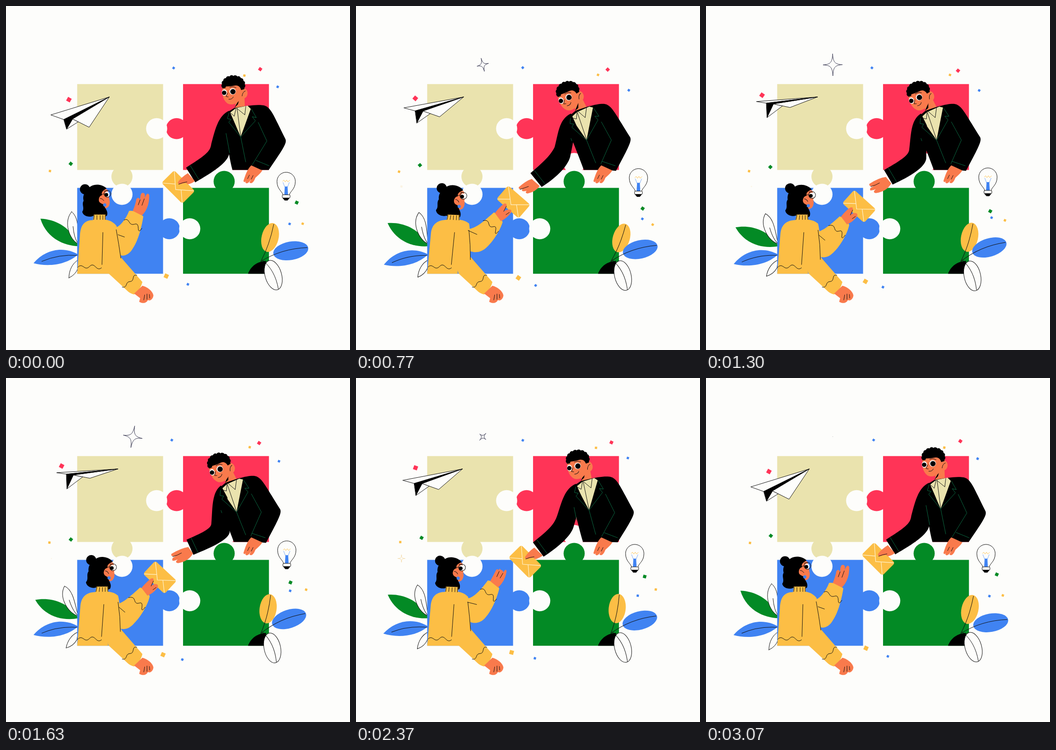
Write an HTML page that moves like this. It is 748x748 px and loops after 3110 ms.

```html
<!DOCTYPE html>
<html lang="en">
<head>
<meta charset="utf-8">
<title>Puzzle teamwork</title>
<style>
  html, body { margin: 0; width: 100%; height: 100%; overflow: hidden; background: #fdfdfb; }
  svg { display: block; width: 100%; height: 100%; }
  .beige { fill: #eae3ae; } .red { fill: #ff3457; } .blue { fill: #4083f2; } .green { fill: #038a25; }
  .yellow { fill: #fcbe45; } .skin { fill: #f97a4c; } .paper { fill: #fdfdfb; } .black { fill: #000; }
  .ink { stroke: #111; stroke-width: 1; stroke-linejoin: round; stroke-linecap: round; }
  .line { fill: none; }
  .seam { fill: none; stroke: #0c6a43; stroke-width: 1; }
</style>
</head>
<body>
<svg viewBox="0 0 749 749" xmlns="http://www.w3.org/2000/svg">
  <g id="leafGreen"><path class="green" d="M75 463C110 464 145 485 158 523C125 522 88 505 75 463Z"/></g>
  <g id="leafWhite"><path class="paper ink" d="M143 448C160 462 156 490 157 518C138 508 124 470 143 448Z"/><path class="line ink" d="M146 480Q148 505 157 518"/></g>
  <g id="leafSmall"><path class="paper ink" d="M137 592C137 575 145 560 157 553V570Q152 585 137 592Z"/></g>
  <g id="leafBlue"><path class="blue" d="M60 560C85 530 125 522 157 541C130 565 90 568 60 560Z"/><path class="line ink" d="M78 556Q115 540 157 543"/></g>

  <g class="beige"><rect x="155" y="170" width="187" height="187"/><circle cx="252.500" cy="371.500" r="23"/></g>
  <g class="red"><rect x="385.500" y="170" width="187" height="187"/><circle cx="371.500" cy="267" r="23"/></g>
  <g class="blue"><rect x="155" y="396" width="187" height="187"/><circle cx="355.500" cy="485" r="23"/></g>
  <g class="paper"><circle cx="328" cy="267" r="23"/><circle cx="475" cy="343" r="23"/><circle cx="252.500" cy="410" r="23"/></g>
  <g class="green"><rect x="385.500" y="396" width="187" height="187"/><circle cx="475" cy="382" r="23"/></g>
  <circle class="paper" cx="400" cy="485" r="23"/>

  <path d="M527 583C533 566 548 556 566 555V583Z"/>
  <g id="petalYellow"><ellipse class="yellow" cx="575" cy="504" rx="18.500" ry="32" transform="rotate(13 575 504)"/><path class="line ink" d="M583 475Q574 520 555 556"/></g>
  <g id="petalBlue"><ellipse class="blue" cx="620" cy="533" rx="38.500" ry="20" transform="rotate(-10 620 533)"/><path class="line ink" d="M656 526Q600 528 555 556"/></g>
  <g id="petalWhite"><ellipse class="paper ink" cx="582" cy="586" rx="18" ry="33" transform="rotate(-16 582 586)"/><path class="line ink" d="M593 616Q586 575 558 553"/></g>

  <g id="plane" class="ink">
    <path class="paper"/><path class="paper"/><path class="paper"/><path class="black"/>
  </g>
  <g id="confetti"></g>
  <path id="star" class="paper" stroke="#33334d" vector-effect="non-scaling-stroke" d="M0-24C1-5 5-1 21 0C5 1 1 5 0 24C-1 5-5 1-21 0C-5-1-1-5 0-24Z"/>
  <path id="glint" class="line" stroke="#f0cf8c" stroke-width=".8" d="M0-9C0-2 2 0 9 0C2 0 0 2 0 9C0 2-2 0-9 0C-2 0 0-2 0-9Z"/>

  <g id="bulb">
    <path class="paper ink" d="M603 412C603 404 590 400 590 382A20 20 0 0 1 630 382C630 400 617 404 617 412Z"/>
    <path class="blue" d="M607 393H613L614 411H606Z"/>
    <path class="line" stroke="#4083f2" stroke-width=".7" d="M603 384L607 394M617 384L613 394"/>
    <path class="line" stroke="#fcbe45" stroke-width=".9" d="M602 382L605 379L608 383L611 379L614 383L618 379"/>
    <rect class="paper ink" x="601.500" y="411" width="17" height="7" rx="2"/>
    <path class="ink" d="M603 418H617L613 423H607Z"/>
  </g>

  <!-- man -->
  <path id="manNeck" class="skin"/>
  <path id="manTorso"/>
  <path id="shirt" class="beige"/>
  <path id="collar" class="line ink"/>
  <path id="manShade"/>
  <path id="manArm"/>
  <path id="manSeams" class="seam"/>
  <path id="cuffSeam" class="seam"/>
  <path class="skin" d="M534 347C525 355 520 372 517 381C519 386 523 382 526 376L521 384C525 389 529 384 534 377L530 384C535 389 540 382 543 374C552 366 556 362 558 358Z"/>
  <path class="line ink" stroke-width=".8" d="M526 376L530 368M534 377L538 369"/>
  <g id="manHead">
    <path class="skin" d="M471 174C470 195 473 205 482 212C491 217 503 214 510 203L520 180L515 165H474Z"/>
    <ellipse class="skin" cx="517.500" cy="190" rx="8.500" ry="11"/>
    <path class="line ink" d="M514 196Q515 187 521 185"/>
    <g id="curls"></g>
    <path d="M471 175C470 163 481 156 495 156C510 156 521 164 519 181L512 183C510 176 506 173 500 173Q485 176 471 175Z"/>
    <ellipse cx="475.500" cy="188.500" rx="5.500" ry="7" fill="#fff"/><circle cx="475" cy="189" r="4.800"/>
    <circle cx="493.500" cy="186" r="7" fill="#fff"/><circle cx="494" cy="186.500" r="5.800"/>
    <path class="line ink" d="M471 179L478 178M487 177Q494 174 501 178M483 189L479 197L484 198M485 203Q492 204 495 198"/>
  </g>

  <!-- woman -->
  <path class="yellow" d="M215 552L250 547L297 601Q293 618 279 628Q270 626 264 620L223 582Z"/>
  <path class="skin" d="M279 626L297 609C309 612 320 622 321 630C320 639 313 643 309 640C305 648 297 648 290 644L292 636Z"/>
  <path class="line ink" d="M302 629L300 640M307 627L307 639M312 628L313 636M253 612Q260 614 262 607T270 600T277 592T285 586"/>
  <path id="torso" class="yellow"/>
  <path id="arm" class="yellow"/>
  <path id="folds" class="line ink"/>
  <path id="wave" class="line ink"/>
  <path class="line ink" d="M156 569Q162 562 169 568T182 567T195 568T208 570"/>
  <g id="head">
    <path class="skin" d="M205 398L220 399C225 408 223 416 226 425C226 433 224 439 217 440L208 444L198 420Z"/>
    <circle cx="172" cy="399" r="11"/>
    <path d="M178 400C184 387 206 385 219 397C212 402 207 404 209 412C200 414 200 428 212 432C216 442 223 446 220 456C212 463 200 459 190 457C180 461 168 457 166 448C172 440 164 432 169 424C166 412 172 404 178 400Z"/>
    <ellipse class="skin" cx="209" cy="422" rx="7" ry="8"/>
    <path class="line ink" d="M205 419Q210 419 213 424M209 410L214 409M214 403L221 402"/>
    <circle class="blue" cx="215" cy="433" r="3.500"/>
    <ellipse cx="220" cy="410" rx="5" ry="6" fill="#fff"/><circle cx="218.500" cy="411" r="4"/>
    <circle class="line ink" cx="221" cy="409" r="7.500"/>
  </g>
  <path id="neck" class="yellow"/>
  <path id="neckRibs" class="line ink"/>

  <g id="envelope">
    <rect class="yellow" x="-32" y="-19.500" width="64" height="39" rx="5"/>
    <path class="line" stroke="#fff3cf" stroke-width="1.200" d="M-30-18L0 8L30-18M-30 18L-9 0M30 18L9 0"/>
  </g>
  <path id="manHand" class="skin"/><path id="manFinger" class="line ink"/>
  <path id="hand" class="skin"/><path id="fingers" class="line ink"/>
</svg>
<script>
const LOOP = 3110;
const TIMES = [0, 470, 1000, 1630, 2070, 2600, LOOP];
const POSES = [0, 1, 2, 3, 1, 0];   // rest, meet, away, away (drifting), meet, rest
const $ = id => document.getElementById(id);
const NS = 'http://www.w3.org/2000/svg';

function add(parent, tag, attrs) {
  const el = parent.appendChild(document.createElementNS(NS, tag));
  for (const name in attrs) el.setAttribute(name, attrs[name]);
  return el;
}

// Each body part has one outline per pose; outlines share a structure and blend number by number.
const parts = {
  manTorso: [
    'M497 222C515 219 540 214 558 216C577 217 583 240 608 289C612 297 608 305 572 357L548 357L493 357C487 335 482 300 478 275L484 230Z',
    'M478 228C500 220 525 212 540 213C557 215 564 234 597 286C600 293 597 302 566 359L548 357L496 357C488 335 476 305 468 285L466 238Z'],
  manNeck: ['M500 198L519 190L520 218Q512 226 499 223Z', 'M474 212L492 200L503 222Q492 234 479 232Z'],
  manShade: ['M508 203L497 222L505 214Z', 'M484 211L477 228L484 222Z'],
  shirt: ['M488 232L501 222L526 217L533 224L511 285Z', 'M468 243L481 231L508 219L516 221L502 292Z'],
  collar: [
    'M501 222L497 240L488 232M503 222L511 284M522 219L520 237L504 224',
    'M481 231L480 246L468 243M482 232L502 291M502 221L499 243L484 230'],
  manSeams: [
    'M549 253L568 294L536 346M544 336L573 348M511 285L522 340M486 232L482 245L490 247L485 253L511 285M534 224L545 243L536 241L543 250L511 285M479 277L487 320',
    'M534 252L556 292L533 344M535 338L565 348M502 292L522 342M467 244L466 256L474 257L470 264L502 292M517 222L529 240L520 240L527 248L502 292M468 288L470 294'],
  manArm: [
    'M486 228C462 238 455 270 447 300C445 315 440 322 392 352L412 384C450 362 485 340 486 320L500 260Z',
    'M468 234C440 245 436 275 424 300C412 320 398 338 375 367L403 397C418 382 444 352 456 326L480 260Z',
    'M468 234C443 248 444 276 438 312C434 323 426 332 383 362L405 392C440 374 470 352 473 330L480 260Z',
    'M468 234C447 250 450 285 447 318C446 326 436 334 393 352L408 385C450 368 484 352 487 336L482 260Z'],
  cuffSeam: ['M401 347L420 378', 'M383 360L410 389', 'M392 357L413 387', 'M403 348L418 380'],
  manHand: [
    'M396 364Q380 374 374 384Q375 390 383 387Q388 386 392 385Q393 386 394 387Q395 388 397 388Q406 386 411 381Z',
    'M376 377Q366 386 358 400Q358 406 367 402Q372 401 376 400Q378 402 380 403Q382 404 385 404Q392 400 400 395Z',
    'M387 376Q372 377 352 391Q350 397 362 396Q350 400 354 405Q360 405 366 402Q357 410 366 411Q390 408 400 390Z',
    'M397 368Q382 370 360 383Q358 390 370 388Q359 392 363 398Q368 398 374 395Q366 402 375 403Q398 399 407 382Z'],
  manFinger: ['M376 388Q385 384 394 383', 'M360 403Q369 399 378 399', 'M355 397Q366 394 374 389', 'M363 389Q374 386 382 381'],
  neck: ['M191 454L217 454L217 470L189 470Z', 'M203 454L230 457L230 470L200 470Z', 'M197 454L222 454L223 470L194 470Z'],
  neckRibs: [
    'M192 455L191 465M198 456L198 465M205 456L205 465M211 456L211 465M216 455L216 465',
    'M204 455L202 465M210 456L208 465M216 457L215 466M223 457L222 467M229 457L228 468',
    'M198 455L196 465M204 456L203 465M210 456L210 465M216 456L216 465M221 455L222 465'],
  torso: [
    'M190 466C170 466 162 478 161 500L155 583L229 583L222 560L250 549C248 520 246 490 240 478C232 468 222 466 216 465Z',
    'M202 465C180 465 168 474 165 492L155 583L220 583L222 560L249 553C250 520 250 495 250 474C245 470 238 467 230 466Z',
    'M196 466C175 466 164 476 162 496L155 583L222 583L222 560L249 552C250 520 248 490 244 474C238 468 230 466 222 465Z'],
  arm: [
    'M240 482C250 478 262 462 268 446Q284 444 299 458C294 490 285 515 276 528C268 542 256 546 248 542Z',
    'M249 476C270 478 295 450 316 433Q328 440 332 459C322 480 305 500 292 510C280 520 262 520 249 514Z',
    'M244 492C260 486 275 474 290 460Q304 463 311 478C306 500 290 525 280 535C268 548 258 549 249 547Z',
    'M244 492C260 486 275 471 292 456Q305 460 313 475C308 498 290 523 280 533C268 547 258 548 249 546Z'],
  folds: [
    'M211 493L209 563M240 487Q246 520 250 549M244 498L258 503',
    'M217 493L207 563M249 489Q250 520 249 553M241 473L270 478',
    'M213 493L208 563M244 488Q249 520 249 552M246 499L259 510'],
  wave: [
    'M257 466Q264 462 268 470T280 475T288 484T296 484',
    'M292 451Q302 448 303 458T312 466T316 475T322 477',
    'M267 478Q278 475 280 484T290 490T296 499T303 499'],
  hand: [
    'M276 446Q282 432 284 420Q290 414 292 424Q292 402 301 408Q304 412 301 420Q308 402 312 412Q312 440 296 456Z',
    'M317 437Q328 422 338 414Q344 414 342 420Q340 426 336 432Q344 428 352 428Q356 430 352 436Q344 446 330 456Z',
    'M293 460Q302 448 312 441Q320 438 318 446Q316 452 314 456Q322 450 328 454Q330 460 324 464Q318 472 306 477Z',
    'M295 457Q305 445 315 437Q323 434 321 442Q319 448 317 452Q325 446 330 450Q333 456 327 460Q321 468 308 474Z'],
  fingers: [
    'M292 422L288 433M301 420L296 434',
    'M342 420L335 432M349 433L341 438',
    'M318 446L313 457M324 460L317 465',
    'M321 442L316 453M327 456L320 461']
};

// class, size, tilt, then centre / cosine / sine terms for x and y
const bits = [
  ['red', 9, 30, 129, 8, 0, 198, 6, 3],
  ['blue', 5, 35, 363, 2, 0, 135, 0, -.7],
  ['red', 7, 35, 552, 1.5, -4, 139.5, -2, -1],
  ['yellow', 5, 15, 525, -6, 2, 151, .5, -1],
  ['blue', 5, 25, 593, -1.5, 1, 179, -3, 4.5],
  ['green', 7, 40, 141, 0, -1.8, 347.5, -4, -.8],
  ['yellow', 5, 10, 95, .7, -1.3, 359, .3, 1.8],
  ['green', 7, 25, 626, 7, -2, 437, -9, 4],
  ['blue', 5, 20, 618.5, -1, 5, 468.5, 6, -5],
  ['yellow', 5, 20, 649.5, -3.5, -3.5, 468, 6, 8],
  ['yellow', 9, 25, 346, 3, 7.5, 595, -7, -3],
  ['blue', 5, 25, 390, 6, 1, 609.5, -3.5, -1]
].map(([cls, size, ...motion]) => ({
  motion,
  el: add($('confetti'), 'rect', { class: cls, x: -size / 2, y: -size / 2, width: size, height: size })
}));

for (let i = 0; i < 10; i++) {
  const a = Math.PI * (.97 + i * .118);
  add($('curls'), 'circle', { cx: 495 + 21 * Math.cos(a), cy: 172 + 16.5 * Math.sin(a), r: 5.2 });
}

const NUMBER = /-?\d+(\.\d+)?/g;
function blend(a, b, k) {
  const ends = b.match(NUMBER);
  let i = 0;
  return a.replace(NUMBER, v => (+v + (ends[i++] - v) * k).toFixed(2));
}

const place = (id, x, y, r = 0, s = 1, ox = 0, oy = 0) =>
  $(id).setAttribute('transform', `translate(${x} ${y}) rotate(${r}) scale(${s}) translate(${-ox} ${-oy})`);
const turn = (id, r, x, y) => $(id).setAttribute('transform', `rotate(${r} ${x} ${y})`);

function draw(t) {
  let i = 0;
  while (t >= TIMES[i + 1]) i++;
  const next = (i + 1) % 6;
  const k = (1 - Math.cos(Math.PI * (t - TIMES[i]) / (TIMES[i + 1] - TIMES[i]))) / 2;
  const key = (...v) => v[i] + (v[next] - v[i]) * k;
  const c = Math.cos(2 * Math.PI * t / LOOP), s = Math.sin(2 * Math.PI * t / LOOP);
  const p = (1 - c) / 2;

  for (const id in parts) {
    const poses = parts[id];
    const at = n => poses[Math.min(POSES[n], poses.length - 1)];
    $(id).setAttribute('d', blend(at(i), at(next), k));
  }
  place('manHead', key(495, 463, 462, 465, 459, 499), key(178, 190, 191, 190, 193, 177),
    key(0, -16, -16, -15, -17, 1.5), 1, 495, 178);
  place('head', 195 + key(0, 17, 7, 10.5, 20.5, .5), 425 + key(0, 1.5, 0, 0, 1, 1),
    key(0, 13, 4.5, 6.5, 14.5, 0), 1, 195, 425);
  place('envelope', key(375, 359, 332, 335, 356, 376.5), key(394, 409, 438, 434, 412, 392),
    key(45, 41, 41, 43, 44, 46));

  place('star', 276, 128, key(0, -20, -10, 10, 38, 45), key(0, .02, 1, 1, .55, .35));
  place('glint', 99, 393, key(0, 30, 90, 90, 90, 90), key(0, .5, .2, .15, .9, .9));

  for (const { el, motion: [tilt, x, xc, xs, y, yc, ys] } of bits)
    el.setAttribute('transform',
      `translate(${x + xc * c + xs * s} ${y + yc * c + ys * s}) rotate(${tilt + 10 * s})`);
  place('bulb', 611 - c + 4 * s, 388 + 4 * c - 4 * s, 0, 1, 610, 392);

  turn('leafGreen', -13 * p, 158, 523);
  turn('leafWhite', -13 * p + 1.5 * s, 157, 518);
  turn('leafBlue', -2 * s, 157, 542);
  turn('leafSmall', 10 * p - s, 157, 555);
  turn('petalYellow', -2 + 2 * c + 5 * s, 555, 556);
  turn('petalBlue', -7.5 * p + s, 555, 556);
  turn('petalWhite', 4 * p, 555, 556);

  const shift = Math.min(0, 2 * s);
  const at = (x0, y0, x1, y1) => `${x0 + (x1 - x0) * p + shift} ${y0 + (y1 - y0) * p}`;
  const nose = at(225, 198, 244, 198), left = at(98, 237, 111, 206), low = at(132, 268, 133, 241);
  const right = at(181, 264, 183, 218), foldL = at(126, 247, 132, 209), foldR = at(145, 246, 147, 211);
  const flap = at(157, 252, 167, 215);
  [[left, nose, foldL], [low, foldR, flap], [nose, right, foldR], [foldL, nose, foldR, low]]
    .forEach((pts, n) => $('plane').children[n].setAttribute('d', 'M' + pts.join('L') + 'Z'));
}

const start = performance.now();
function tick() {
  draw((performance.now() - start) % LOOP);
  requestAnimationFrame(tick);
}
tick();
</script>
</body>
</html>
```
